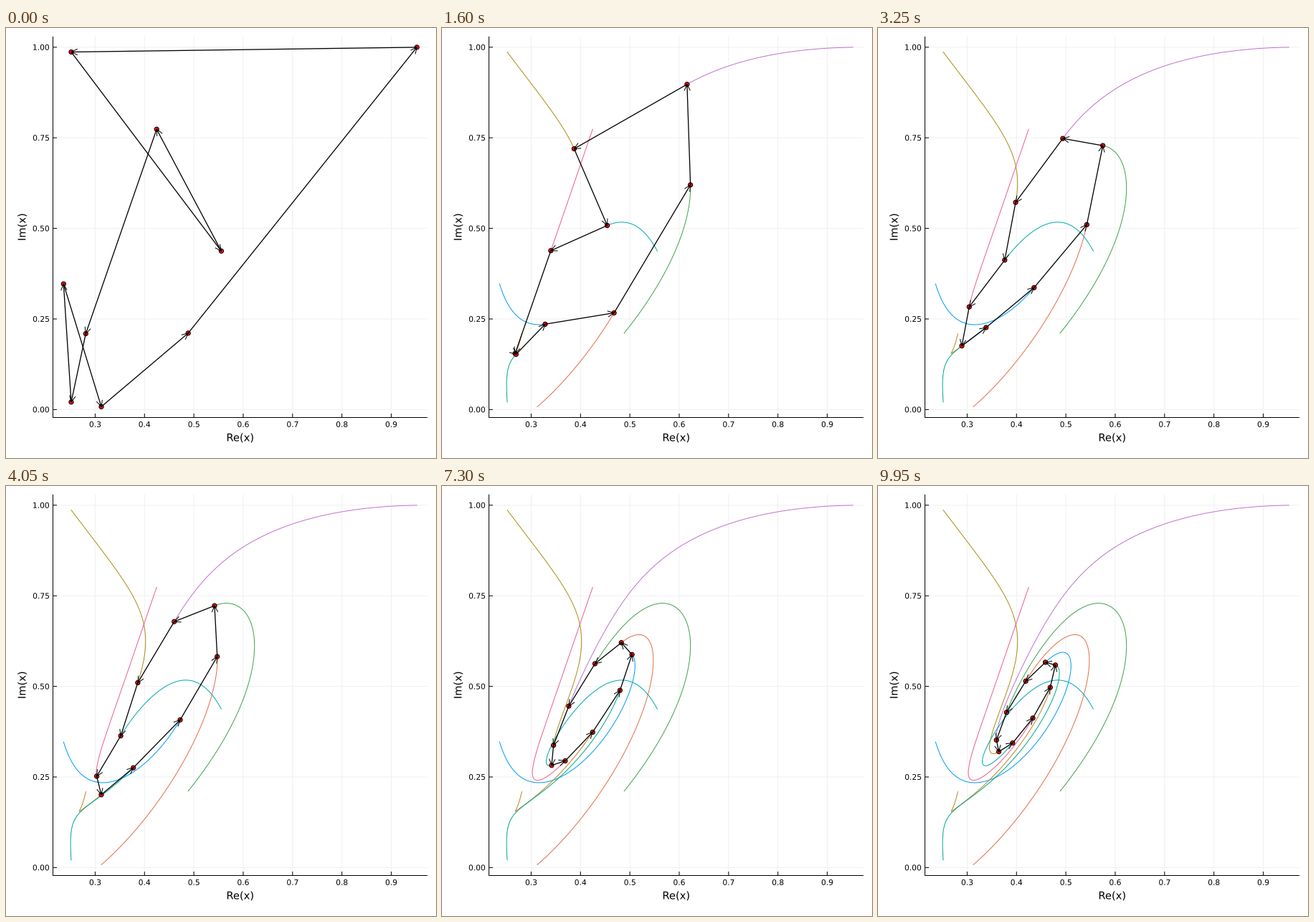
Recreate the animation shown at these times as a matplotlib script. Size 600 by 600 pixels, loop 10 s.

```python
import numpy as np
import matplotlib.pyplot as plt
from matplotlib.animation import FuncAnimation
from matplotlib.collections import LineCollection
from matplotlib.patches import Circle, PathPatch
from matplotlib.textpath import TextPath
from matplotlib.transforms import Affine2D

SIZE, DPI = 600, 100
FRAMES, INTERVAL = 200, 50
T_END = 5.0
PX = 72 / DPI  # one pixel in points

# Start positions on the stage, y pointing down
START = np.array([
    80.3 + 357.1j, 133.0 + 528.4j, 254.2 + 425.8j,
    573.3 + 26.9j, 91.0 + 33.5j, 300.4 + 311.2j,
    210.2 + 141.3j, 111.3 + 426.5j, 91.0 + 521.9j,
])
COLORS = ["#009afa", "#e36f47", "#3ea44e", "#c371d2", "#ac8e18",
          "#00aaae", "#ed5e93", "#c68225", "#00a98d"]
LEFT, RIGHT, TOP, BOTTOM = 65.5, 588.2, 11.8, 543.5
TICK = 5.5
TICK_FONT, AXIS_FONT = 10.67, 14.67
HEAD = 8.8 + 4.2j  # arrow head: length and half width


def pursuit(times):
    """Each point chases the next: z_k' = z_(k+1) - z_k, solved by Fourier modes."""
    n = len(START)
    rates = np.exp(2j * np.pi * np.arange(n) / n) - 1
    modes = np.fft.fft(START)
    return np.fft.ifft(modes * np.exp(np.outer(times, rates)), axis=1)


def xy(z):
    return np.column_stack([z.real, z.imag])


def rule(x, y, color="black", z=1):
    ax.plot(x, y, color=color, lw=PX, zorder=z, snap=False,
            solid_capstyle="butt")


def label(x, y, text, size, align=0.5, turn=0):
    """Text outline on a baseline at (x, y), free of pixel rounding."""
    path = TextPath((0, 0), text, size=size, prop={"family": "DejaVu Sans"})
    box = path.get_extents()
    place = (Affine2D().translate(-box.x0 - align * box.width, 0)
             .rotate_deg(turn).scale(1, -1).translate(x, y))
    ax.add_patch(PathPatch(path.transformed(place), fc="black", ec="none",
                           lw=0, snap=False))


paths = pursuit(np.linspace(0, T_END, FRAMES))

fig = plt.figure(figsize=(SIZE / DPI, SIZE / DPI), dpi=DPI, facecolor="white")
ax = fig.add_axes([0, 0, 1, 1])
ax.set_xlim(0, SIZE)
ax.set_ylim(SIZE, 0)
ax.axis("off")

# Grid, ticks and axes
for k in range(7):
    x = 124.4 + 68.86 * k
    rule([x, x], [TOP, BOTTOM], "#f0f0f0", z=0)
    rule([x, x], [BOTTOM - TICK, BOTTOM])
    label(x, 556.8, f"{0.3 + 0.1 * k:.1f}", TICK_FONT)
for k in range(5):
    y = 532.4 - 126.4 * k
    rule([LEFT, RIGHT], [y, y], "#f0f0f0", z=0)
    rule([LEFT, LEFT + TICK], [y, y])
    label(60, y + 3.9, f"{0.25 * k:.2f}", TICK_FONT, align=1)
rule([LEFT, LEFT], [TOP, BOTTOM + 0.5])
rule([LEFT - 0.5, RIGHT], [BOTTOM, BOTTOM])
label((LEFT + RIGHT) / 2, 576.5, "Re(x)", AXIS_FONT)
label(27.3, (TOP + BOTTOM) / 2, "Im(x)", AXIS_FONT, turn=90)

trails = [ax.plot([], [], color=c, lw=PX, zorder=2)[0] for c in COLORS]
dots = [ax.add_patch(Circle((0, 0), 3.1, fc="red", ec="black", lw=PX, zorder=3))
        for _ in START]
shafts = LineCollection([], colors="black", linewidths=1.3 * PX, zorder=4)
heads = LineCollection([], colors="black", linewidths=PX, zorder=4)
for lines in (shafts, heads):
    lines.set_snap(False)
    ax.add_collection(lines, autolim=False)


def draw(i):
    now = paths[i]
    tips = np.roll(now, -1)
    back = (now - tips) / np.abs(now - tips)
    for trail, dot, line in zip(trails, dots, paths[:i + 1].T):
        trail.set_data(line.real, line.imag)
        dot.set_center((line[-1].real, line[-1].imag))
    shafts.set_segments([xy(np.array(p)) for p in zip(now, tips)])
    arms = zip(tips + back * HEAD, tips, tips + back * np.conj(HEAD))
    heads.set_segments([xy(np.array(p)) for p in arms])
    return [*trails, *dots, shafts, heads]


anim = FuncAnimation(fig, draw, frames=FRAMES, interval=INTERVAL,
                     repeat=True, repeat_delay=0, blit=False)
plt.show()
```
